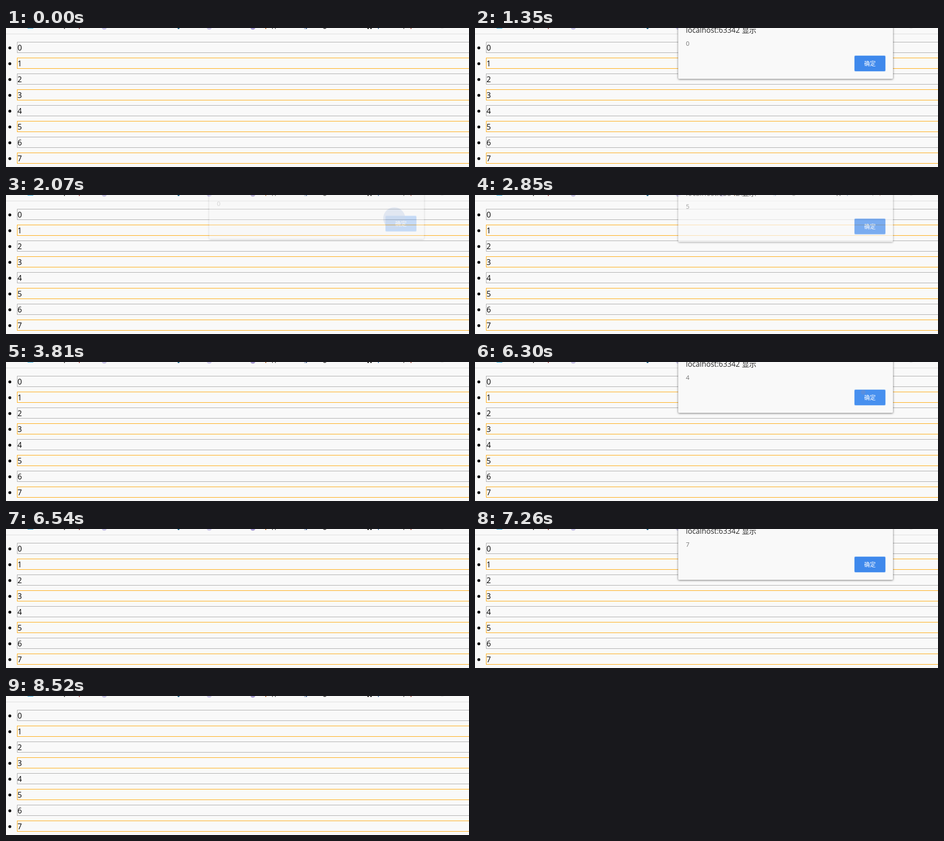
Write an HTML page with a canvas that moves like this. It is 966 by 290 pixels and loops after 9.45 s.

```html
<!DOCTYPE html>
<html lang="zh-CN">
<head>
<meta charset="utf-8">
<title>List alerts</title>
<style>
html, body { margin: 0; width: 100%; height: 100%; overflow: hidden; background: #f9f9f9; }
canvas { display: block; }
</style>
</head>
<body>
<canvas id="stage" width="966" height="290"></canvas>
<script>
const W = 966, H = 290, LOOP = 9450, STEP = 30;
const LATIN = '"Open Sans", sans-serif';
const CJK = '"Noto Sans CJK SC", "Noto Sans CJK", sans-serif';
const ctx = document.getElementById('stage').getContext('2d');

function layer() {
  const c = document.createElement('canvas');
  c.width = W;
  c.height = H;
  return c.getContext('2d');
}
const page = layer(), box = layer();

// open / close: first and last change; hover: when the button lightens
const alerts = [
  { value: '0', open: [1200, 1350], hover: 1620, close: [1890, 2130] },
  { value: '5', open: [2790, 2910], hover: 3300, close: [3600, 3810] },
  { value: '4', open: [4500, 4620], hover: 6300, close: [6300, 6540] },
  { value: '7', open: [7110, 7260], hover: 8040, close: [8310, 8520] }
];

function text(g, str, x, y, font, color) {
  g.font = font;
  g.fillStyle = color;
  g.fillText(str, x, y);
}

function rect(g, x, y, w, h, color) {
  g.fillStyle = color;
  g.fillRect(x, y, w, h);
}

function disc(g, x, y, r, color) {
  g.fillStyle = color;
  g.beginPath();
  g.arc(x, y, r, 0, Math.PI * 2);
  g.fill();
}

function rounded(g, x, y, w, h, r, color) {
  g.fillStyle = color;
  g.beginPath();
  g.roundRect(x, y, w, h, r);
  g.fill();
}

// Lower edge of the bookmark bar
function drawBookmarks(g) {
  rect(g, 45, 0, 12, 1, '#1ba4dc');
  for (const [x, color] of [[205, '#c9c4e6'], [424, '#cdc8ea'], [515, '#a79bd2']])
    disc(g, x, -2, 5.5, color);
  disc(g, 360, 0, 2.2, '#17658c');
  disc(g, 665, -2, 4, '#555');
  disc(g, 910, -3, 4.5, '#e3e3e3');
  rect(g, 754, 0, 3, 2, '#222');
  rect(g, 760, 0, 3, 2, '#222');
  const tails = [[121, '#555'], [152, '#a55'], [541, '#b66a2c'], [555, '#777'],
                 [561, '#777'], [626, '#46679a'], [776, '#47a'], [829, '#777'], [844, '#a54']];
  for (const [x, color] of tails) rect(g, x, 0, 2, 2, color);
  rect(g, 622, 1, 4, 1, '#7890b4');
}

function drawPage(g) {
  rect(g, 0, 0, W, H, '#f9f9f9');
  drawBookmarks(g);
  rect(g, 0, 12, W, 1, '#dcdcdc');
  for (let i = 0; i < 8; i++) {
    const y = 29 + i * 33;
    g.strokeStyle = i % 2 ? '#ffa500' : '#a9a9a9';
    g.lineWidth = 1;
    g.strokeRect(23.5, y + 0.5, W, 22);
    disc(g, 8, y + 12.5, 3, '#000');
    text(g, String(i), 24, y + 18, '16px ' + LATIN, '#000');
  }
}

function drawDialog(g, value, hover, ripple) {
  g.clearRect(0, 0, W, H);
  g.save();
  g.shadowColor = 'rgba(0,0,0,.55)';
  g.shadowBlur = 4;
  g.shadowOffsetY = 1;
  rounded(g, 424, -40, 448, 146, 2, '#f9f9f9');
  g.restore();

  text(g, 'localhost:63342', 440, 10, '15.4px ' + LATIN, '#2b2b2b');
  text(g, '显示', 557, 10, '15px ' + CJK, '#2b2b2b');
  text(g, value, 440, 37, '13px ' + LATIN, '#757575');

  rounded(g, 791, 57, 66, 34, 3, '#b9d5f8');
  rounded(g, 792, 58, 64, 32, 2, hover ? '#4790ef' : '#3f89ec');
  if (ripple) disc(g, 810, 63, ripple, 'rgba(105,140,205,.55)');
  text(g, '确定', 812, 79, '500 12px ' + CJK, '#fff');
}

function pose(a, t) {
  if (t < a.open[1]) {
    const steps = (a.open[1] - a.open[0]) / STEP + 1;
    const p = ((t - a.open[0]) / STEP + 1) / steps;
    return { alpha: Math.pow(p, 0.75), shift: -21 * (1 - p), ripple: 0 };
  }
  if (t < a.close[0]) return { alpha: 1, shift: 0, ripple: 0 };
  const since = t - a.close[0];
  const fade = a.close[1] - a.close[0] - STEP;
  const p = Math.max(0, (since - STEP) / fade);
  return { alpha: 1 - p, shift: -20 * p, ripple: 5 + since / STEP * 3 };
}

function draw(now) {
  const t = Math.floor((now % LOOP) / STEP) * STEP;
  ctx.drawImage(page.canvas, 0, 0);
  const a = alerts.find(d => t >= d.open[0] && t < d.close[1]);
  if (a) {
    const { alpha, shift, ripple } = pose(a, t);
    drawDialog(box, a.value, t >= a.hover, ripple);
    ctx.globalAlpha = alpha;
    ctx.drawImage(box.canvas, 0, shift);
    ctx.globalAlpha = 1;
  }
}

drawPage(page);
const start = performance.now();
function tick() {
  draw(performance.now() - start);
  requestAnimationFrame(tick);
}
tick();
</script>
</body>
</html>
```
